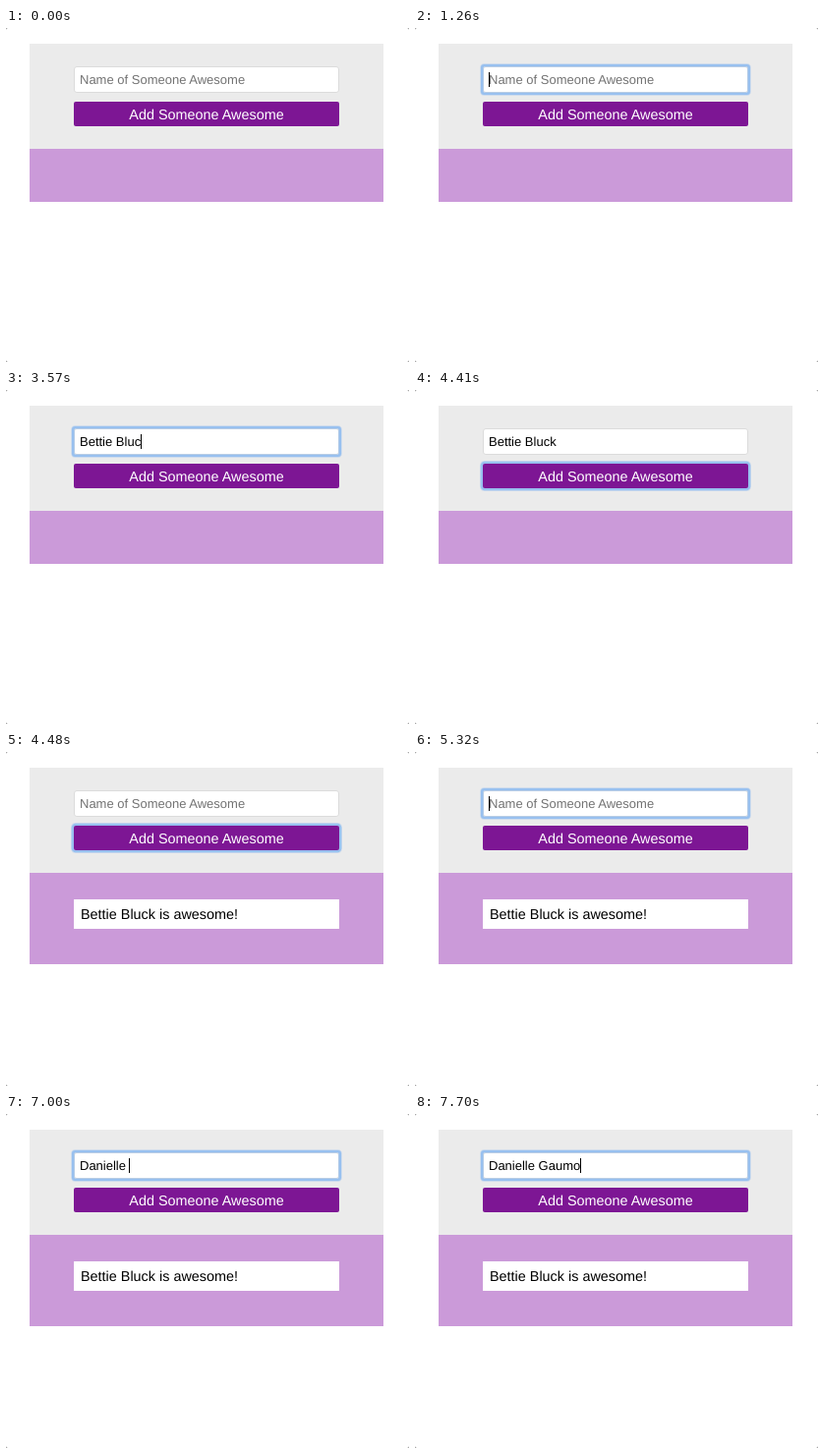
An HTML page for the animation above (8000 ms loop, 410x340 px).

```html
<!DOCTYPE html>
<html lang="en">
<head>
<meta charset="utf-8">
<title>Someone Awesome</title>
<style>
html, body { margin: 0; width: 100%; height: 100%; overflow: hidden; background: #fff; }
svg { display: block; width: 410px; height: 340px; }
text {
  font-family: "Liberation Sans", Arial, sans-serif;
  font-size: 14.4px;
  white-space: pre;
  text-rendering: geometricPrecision;
}
.small { font-size: 13px; }
.ring { fill: none; stroke: #98c0ef; }
</style>
</head>
<body>
<svg viewBox="0 0 410 340">
  <rect width="410" height="340" fill="#777"/>
  <rect width="410" height="340" rx="2" fill="#fff"/>
  <rect x="24" y="16" width="360" height="107" fill="#ebebeb"/>
  <rect id="panel" x="24" y="123" width="360" fill="#cb9ad9"/>

  <rect x="69.5" y="39.5" width="269" height="26" rx="2.5" fill="#fff" stroke="#dcdcdc"/>
  <g id="inputRing" class="ring">
    <rect x="67.5" y="37.5" width="273" height="30" rx="3" stroke-width="3" stroke-opacity=".35"/>
    <rect x="68.3" y="38.3" width="271.4" height="28.4" rx="2" stroke-width="2.6"/>
  </g>
  <text id="hint" class="small" x="75" y="57" fill="#737373">Name of Someone Awesome</text>
  <text id="typed" class="small" x="75" y="57"></text>
  <rect id="caret" y="45" width="1" height="15"/>

  <g id="buttonRing" class="ring">
    <rect x="67.5" y="73.5" width="273" height="28" rx="3" stroke-width="3" stroke-opacity=".35"/>
    <rect x="68" y="74" width="272" height="27" rx="3" stroke-width="2.6"/>
  </g>
  <rect x="69" y="75" width="270" height="25" rx="2" fill="#7d1694"/>
  <text x="204" y="93" text-anchor="middle" fill="#fff">Add Someone Awesome</text>

  <g id="item">
    <rect x="69" y="150" width="270" height="30" fill="#fff"/>
    <text id="label" x="76" y="170"></text>
  </g>
</svg>
<script>
const LOOP = 8000, BLINK = 495;
const PRESS = 4410, SUBMIT = 4480;

// Each entry: when the field gains focus, and when each key lands.
const entries = [
  { name: "Bettie Bluck", focus: 1260,
    keys: [1890, 2030, 2100, 2310, 2380, 2450, 2590, 3080, 3290, 3430, 3570, 3780] },
  { name: "Danielle Gaumo", focus: 5250,
    keys: [6020, 6160, 6230, 6300, 6510, 6580, 6720, 6860, 7000, 7140, 7280, 7420, 7560, 7700] }
];

const $ = id => document.getElementById(id);
const show = (id, on) => $(id).setAttribute("visibility", on ? "visible" : "hidden");

$("label").textContent = entries[0].name + " is awesome!";

function draw(t) {
  const added = t >= SUBMIT;
  const { name, focus, keys } = entries[added ? 1 : 0];
  const count = keys.filter(k => k <= t).length;
  const focused = t >= focus && (added || t < PRESS);
  const lastKey = count ? keys[count - 1] : focus;
  const lit = Math.floor((t - lastKey) / BLINK) % 2 === 0;

  $("typed").textContent = name.slice(0, count);
  const width = count ? $("typed").getComputedTextLength() : 0;
  $("caret").setAttribute("x", Math.floor(75 + width));
  $("panel").setAttribute("height", added ? 93 : 54);

  show("hint", count === 0);
  show("caret", focused && lit);
  show("inputRing", focused);
  show("buttonRing", t >= PRESS && t < entries[1].focus);
  show("item", added);
}

function tick() {
  draw(performance.now() % LOOP);
  requestAnimationFrame(tick);
}
tick();
</script>
</body>
</html>
```
